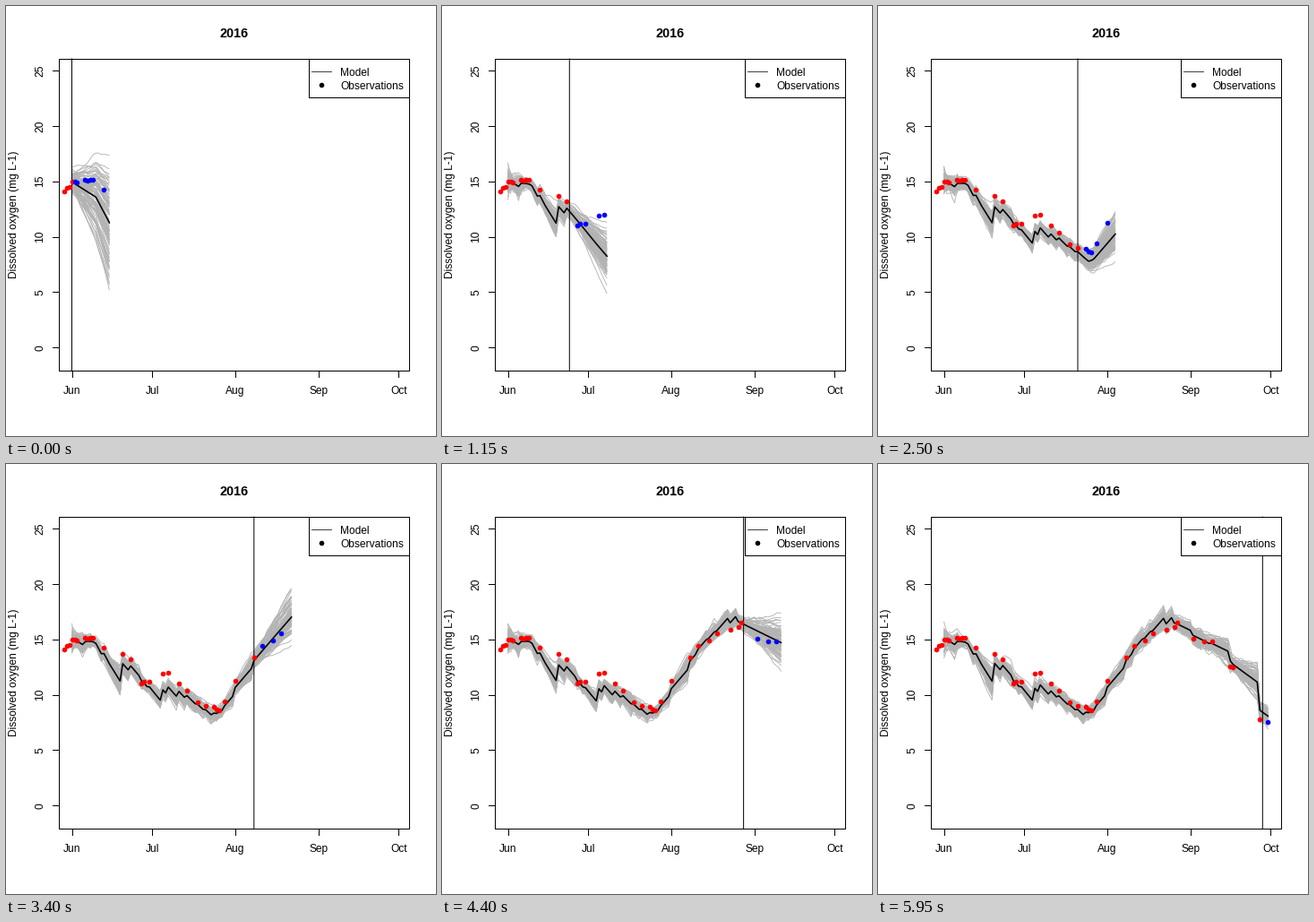
A matplotlib script for the animation above (6000 ms loop, 480 by 480 pixels).

```python
import numpy as np
import matplotlib.pyplot as plt
from matplotlib.animation import FuncAnimation
from matplotlib.collections import LineCollection
from matplotlib.patches import Rectangle

SIZE, DPI = 480, 72            # at 72 dpi one point is one pixel
FRAMES, INTERVAL = 120, 50
LEFT, RIGHT, TOP, BOTTOM = 59.04, 449.76, 59.04, 406.56
LAST_DAY, HORIZON, MEMBERS = 121, 14, 100
OBS_SD = 0.45

np.random.seed(2016)
plt.rcParams["font.family"] = "Liberation Sans"

# Observations: days since 1 June, dissolved oxygen
OBS = np.array([
    (-3, 14.12), (-2, 14.40), (-1, 14.46), (0, 14.97), (1, 14.97), (2, 14.93),
    (5, 15.10), (6, 15.05), (7, 15.15), (8, 15.10), (12, 14.27), (19, 13.68),
    (22, 13.23), (26, 11.02), (27, 11.20), (29, 11.17), (34, 11.90),
    (36, 12.02), (40, 11.00), (43, 10.36), (47, 9.28), (50, 9.00), (53, 8.95),
    (54, 8.68), (55, 8.55), (57, 9.36), (61, 11.28), (68, 13.38), (71, 14.40),
    (75, 14.93), (78, 15.56), (83, 15.84), (86, 16.08), (87, 16.50),
    (93, 15.05), (97, 14.85), (100, 14.81), (107, 12.58), (108, 12.50),
    (118, 7.78), (121, 7.55)])
OBS_AT = {int(d): v for d, v in OBS}

# Daily change of the model state, linear between knots
KNOTS = np.array([
    (0, -.154), (8, -.154), (9, -.46), (13, -.46), (14, -.388), (18, -.388),
    (19, -.275), (30, -.299), (41, -.259), (47, -.22), (50, -.23), (53, -.2),
    (54, .06), (55, .14), (56, .28), (68, .283), (84, .275), (85, -.12),
    (121, -.115)])
TREND = np.interp(np.arange(LAST_DAY + 1), *KNOTS.T)


def px(day):
    return LEFT + (RIGHT - LEFT) * (0.04 + np.asarray(day) / LAST_DAY) / 1.08


def py(value):
    return BOTTOM - (BOTTOM - TOP) * (np.asarray(value) + 2.04) / 28.08


def centred(sd):
    z = np.random.standard_normal(MEMBERS)
    return sd * (z - z.mean())


def rates(day):
    return centred(0.06 + 0.13 * np.exp(-day / 5))


def simulate(now):
    """Ensemble run: assimilate up to `now`, then forecast freely."""
    np.random.seed(2016 + now)
    end = min(now + HORIZON, LAST_DAY)
    x = 14.95 + centred(0.55)
    rate = rates(0)
    run = [x]
    for day in range(1, end + 1):
        step = TREND[day - 1]
        if now >= 108 and day > 108:
            step -= 0.06
        x = x + step + rate + centred(0.09)
        if day <= now and day in OBS_AT:
            gain = x.var() / (x.var() + OBS_SD ** 2)
            x = x + gain * (OBS_AT[day] + centred(OBS_SD) - x)
            rate = rates(day)
        run.append(x)
    return np.arange(end + 1), np.array(run)


fig = plt.figure(figsize=(SIZE / DPI, SIZE / DPI), dpi=DPI, facecolor="white")
ax = fig.add_axes([0, 0, 1, 1])
ax.set(xlim=(0, SIZE), ylim=(SIZE, 0))
ax.axis("off")


def line(xs, ys, width=1, z=6, **kw):
    return ax.plot(xs, ys, color="black", lw=width, zorder=z, **kw)[0]


def dots(color, z):
    return ax.plot([], [], "o", color=color, ms=5.6, mew=0, zorder=z)[0]


def box(x0, y0, x1, y1, fill, z):
    ax.add_patch(Rectangle((x0, y0), x1 - x0, y1 - y0, facecolor=fill,
                           edgecolor="black", lw=1, zorder=z))


def label(x, y, text, size=12, ha="center", va="baseline", **kw):
    ax.text(x, y, text, size=size, ha=ha, va=va, zorder=9, **kw)


def side_label(x, y, text):
    label(x, y, text, va="center", rotation=90)


# Frame, axes and titles
box(LEFT, TOP, RIGHT, BOTTOM, "none", 6)
label((LEFT + RIGHT) / 2, 35, "2016", size=14.4, weight="bold")
side_label(9.5, (TOP + BOTTOM) / 2, "Dissolved oxygen (mg L-1)")
for v in range(0, 26, 5):
    line([LEFT - 7.2, LEFT], [py(v)] * 2)
    side_label(38, py(v), str(v))
line([LEFT] * 2, [py(0), py(25)])
months = {"Jun": 0, "Jul": 30, "Aug": 61, "Sep": 92, "Oct": 122}
for name, day in months.items():
    line([px(day)] * 2, [BOTTOM, BOTTOM + 7.2])
    label(px(day), 433, name)
line([px(0), px(122)], [BOTTOM] * 2)

# Legend
box(338.2, TOP, RIGHT, 102.2, "white", 7)
line([341.2, 363], [73.44] * 2, 0.75, 8)
label(373.4, 78, "Model", ha="left")
label(373.4, 93, "Observations", ha="left")
dots("black", 8).set_data([352], [88])

# Moving parts
members = LineCollection([], colors="#b3b3b3", linewidths=0.9, zorder=1)
ax.add_collection(members, autolim=False)
mean_line = line([], [], 1.6, 2)
now_line = line([], [], 1, 3, snap=False)
past, future = dots("red", 4), dots("blue", 5)


def update(now):
    days, run = simulate(now)
    xs = px(days)
    members.set_segments([np.column_stack((xs, py(m))) for m in run.T])
    mean_line.set_data(xs, py(run.mean(axis=1)))
    now_line.set_data([px(now)] * 2, [TOP, BOTTOM])
    day, value = OBS.T
    seen = day <= now
    ahead = ~seen & (day <= now + HORIZON)
    past.set_data(px(day[seen]), py(value[seen]))
    future.set_data(px(day[ahead]), py(value[ahead]))
    return members, mean_line, now_line, past, future


anim = FuncAnimation(fig, update, frames=FRAMES, interval=INTERVAL,
                     repeat=True, repeat_delay=0)
plt.show()
```
